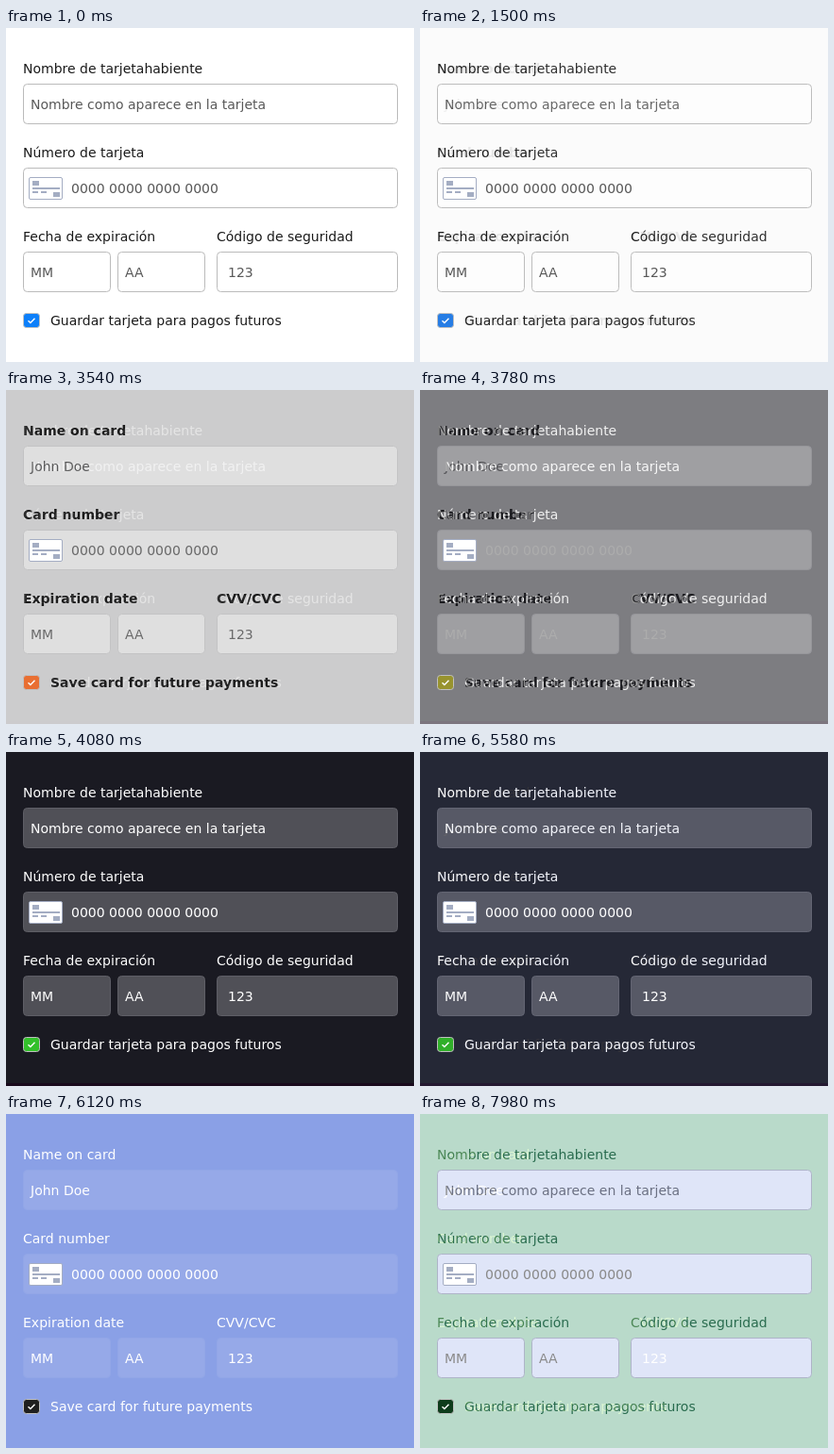
An HTML page for the animation above (8 s loop, 432x354 px).

```html
<!DOCTYPE html>
<html lang="es">
<head>
<meta charset="utf-8">
<title>Card form themes</title>
<style>
  html, body { margin: 0; width: 100%; height: 100%; overflow: hidden; background: #fff; }
  svg { display: block; width: 432px; height: 354px; }
  text { font: 14px "DejaVu Sans", sans-serif; white-space: pre; }
  .bold { font-weight: 700; }
</style>
</head>
<body>
<svg id="stage" viewBox="0 0 432 354" xmlns="http://www.w3.org/2000/svg"></svg>
<script>
const HOLD = 1500, STEP = 60, STEPS = 10, LOOP = 8000;
const SCENE = HOLD + STEP * (STEPS - 1);

const es = {
  name: 'Nombre de tarjetahabiente', holder: 'Nombre como aparece en la tarjeta',
  number: 'Número de tarjeta', date: 'Fecha de expiración',
  code: 'Código de seguridad', save: 'Guardar tarjeta para pagos futuros'
};
const en = {
  name: 'Name on card', holder: 'John Doe', number: 'Card number',
  date: 'Expiration date', code: 'CVV/CVC', save: 'Save card for future payments'
};

const themes = [
  { words: es, bg: '#ffffff', label: '#1a1a1a', field: '#ffffff', edge: '#bbbbbb', hint: '#595959', box: '#0d80fa' },
  { words: en, bg: '#e2e2e2', label: '#1a1a1a', field: '#f0f0f0', edge: '#d0d0d0', hint: '#595959', box: '#ff6633', bold: true },
  { words: es, bg: '#1a1a22', label: '#ffffff', field: '#505057', edge: '#5e5e66', hint: '#ffffff', box: '#33c02b', foot: '#190a1c' },
  { words: en, bg: '#8aa0e6', label: '#ffffff', field: '#96a9e8', edge: '#92a6e7', hint: '#ffffff', box: '#1f1f1f' },
  { words: es, bg: '#cdf3bf', label: '#00560f', field: '#ffffff', edge: '#bbbbbb', hint: '#595959', box: '#08491a', code: '#ffffff' }
];

const rect = (x, y, w, h, fill, extra = '') =>
  `<rect x="${x}" y="${y}" width="${w}" height="${h}" fill="${fill}" ${extra}/>`;

// Box with a 1px border drawn inside its outer size
const framed = (x, y, w, h, r, fill, edge) =>
  rect(x + .5, y + .5, w - 1, h - 1, fill, `rx="${r}" stroke="${edge}"`);

const text = (x, y, words, fill, bold) =>
  `<text x="${x}" y="${y}" fill="${fill}"${bold ? ' class="bold"' : ''}>${words}</text>`;

function cardIcon() {
  const ink = '#a4adc3';
  const parts = [[28, 162, 7, 5], [28, 169, 29, 2], [28, 173, 6, 2], [37, 173, 6, 2], [50, 174, 7, 5]];
  return framed(24, 158, 36, 24, 1.5, '#ffffff', ink) +
    parts.map(p => rect(...p, ink)).join('');
}

function form(t) {
  const w = t.words;
  const label = (x, y, words) => text(x, y, words, t.label, t.bold);
  const field = (x, y, width) => framed(x, y, width, 43, 4, t.field, t.edge);
  const hint = (x, y, words, fill = t.hint) => text(x, y, words, fill);
  return rect(0, 0, 432, 354, t.bg) +
    (t.foot ? rect(0, 351, 432, 3, t.foot) : '') +
    label(18, 48, w.name) + field(18, 59, 397) + hint(26, 86, w.holder) +
    label(18, 137, w.number) + field(18, 148, 397) + cardIcon() + hint(69, 175, '0000 0000 0000 0000') +
    label(18, 226, w.date) + field(18, 237, 93) + hint(26, 264, 'MM') +
    field(118, 237, 93) + hint(126, 264, 'AA') +
    label(223, 226, w.code) + field(223, 237, 192) + hint(235, 264, '123', t.code) +
    framed(18, 302, 18, 16, 3, t.box, '#c0c0c0') +
    '<path d="M23.5 310.2l2.4 2.3 4.6-4.7" fill="none" stroke="#fff" stroke-width="1.4"/>' +
    label(47, 315, w.save);
}

const stage = document.getElementById('stage');
stage.innerHTML = themes.map(t => `<g>${form(t)}</g>`).join('');
const layers = [...stage.children];

function draw() {
  const time = performance.now() % LOOP;
  const current = Math.floor(time / SCENE);
  const local = time % SCENE;
  const mix = local < HOLD ? 0 : (Math.floor((local - HOLD) / STEP) + 1) / STEPS;
  layers.forEach((layer, i) => {
    const opacity = i === current ? 1 : i === current + 1 ? mix : 0;
    layer.style.display = opacity ? '' : 'none';
    layer.style.opacity = opacity;
  });
  requestAnimationFrame(draw);
}
draw();
</script>
</body>
</html>
```
